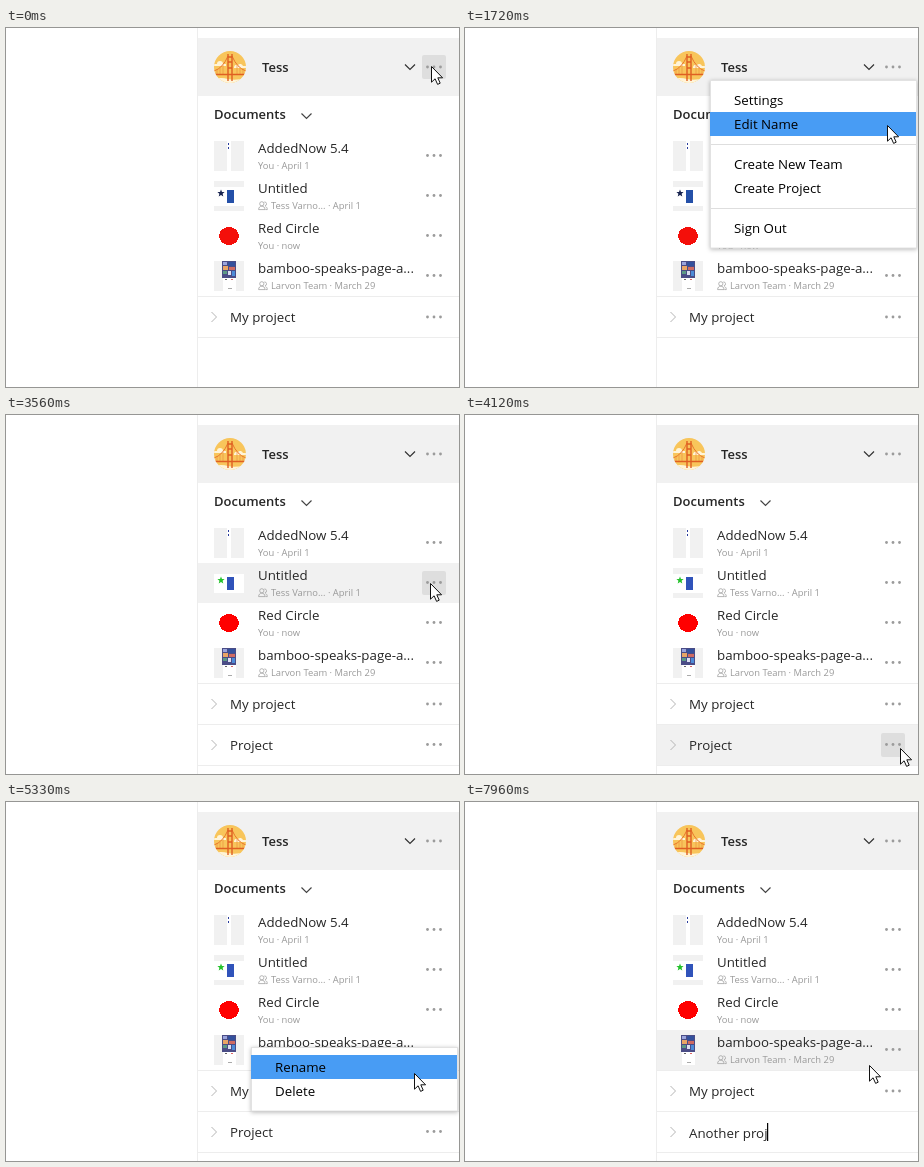
Write an HTML page that moves like this. It is 453 px wide and 359 px high and loops after 8 s.

```html
<!DOCTYPE html>
<html lang="en">
<head>
<meta charset="utf-8">
<title>Project panel</title>
<style>
  html, body { margin: 0; width: 100%; height: 100%; overflow: hidden; background: #fff; }
  svg { display: block; width: 453px; height: 359px; }
  text { font: 13.3px "Open Sans", "Noto Sans", sans-serif; fill: #262626; white-space: pre; }
  .bold { font-size: 13px; font-weight: 600; }
  .sub { font-size: 9.4px; fill: #999; }
  .menu text { fill: #000; }
  .line { stroke: #ededed; fill: none; }
  .dots { fill: #9b9b9b; }
  .sheet { fill: #fff; stroke: #e2e2e2; filter: drop-shadow(0 1px 2px rgba(0, 0, 0, .28)); }
</style>
</head>
<body>
<svg id="stage" viewBox="0 0 453 359" xmlns="http://www.w3.org/2000/svg"></svg>
<script>
const LOOP = 8000;
const CREATED = 3510, EDITING = 5930;

const rect = (x, y, w, h, fill, extra = '') =>
  `<rect x="${x}" y="${y}" width="${w}" height="${h}" fill="${fill}" ${extra}/>`;
const label = (x, y, str, cls = '') => `<text x="${x}" y="${y}" class="${cls}">${str}</text>`;
const stroke = (d, color, width = 1) =>
  `<path d="${d}" fill="none" stroke="${color}" stroke-width="${width}"/>`;
const dots = (y, id = '') => `<g class="dots" id="${id}">` +
  [421.5, 428, 434.5].map(x => `<circle cx="${x}" cy="${y}" r="1.4"/>`).join('') + '</g>';
const divider = y => `<path class="line" d="M192 ${y}H453"/>`;
const arrowRight = y => stroke(`M205.5 ${y - 5}l5 5l-5 5`, '#b5b5b5');
const arrowDown = (x, y, color) => stroke(`M${x} ${y}l5 5l5-5`, color, 1.2);
const people = y => `<g transform="translate(252 ${y})">` + stroke(
  'M3.8 .7a2 2 0 1 1 0 4.2a2 2 0 1 1 0-4.2M.6 8.6c0-4.6 6.4-4.6 6.4 0zM6.3 1a1.8 1.8 0 0 1 .6 3.8M7.3 5.6c1.4.4 2 1.4 2 3H7.4',
  '#a3a3a3', .8) + '</g>';

// Hoverable rows: top, height and centre of the options button
const rows = [
  ...[0, 1, 2, 3].map(i => ({ y: 108 + 40 * i, h: 40, mid: 127.5 + 40 * i })),
  { y: 269, h: 40, mid: 289 },
  { y: 310, h: 40, mid: 329.5, created: true }
];

const documents = [
  ['AddedNow 5.4', 'You · April 1'],
  ['Untitled', 'Tess Varno... · April 1', true],
  ['Red Circle', 'You · now'],
  ['bamboo-speaks-page-a...', 'Larvon Team · March 29', true]
];

const menus = [
  { y: 52, h: 168, open: [690, 930], close: [2700, 2810], press: 650, pick: 2530, seps: [116, 180],
    items: [['Settings', 60], ['Edit Name', 84], ['Create New Team', 124], ['Create Project', 148], ['Sign Out', 188]] },
  { y: 245, h: 64, open: [4480, 4700], close: [5950, 6070], press: 4440, pick: 5790, seps: [],
    items: [['Rename', 253], ['Delete', 277]] }
];

// time, x, y, easing power towards this point (negative eases out)
const path = [
  [1530, 426, 38, 1], [1720, 423, 97, 1.3], [2100, 424, 160, -1.8],
  [3510, 424, 160, 1], [3780, 430, 246, 1.4], [4120, 436, 333, -1.8],
  [5050, 436, 333, 1], [5330, 409, 271, 1.3], [5510, 405, 263, -1.8]
];

const avatar = `
  <clipPath id="disc"><circle cx="224" cy="39" r="16"/></clipPath>
  <g clip-path="url(#disc)">
    ${rect(208, 23, 32, 32, '#f8c55b')}
    <path d="M208 36h3a3 3 0 0 1 6 0h3v2h-12zM228 39a3 3 0 0 1 4-2a3 3 0 0 1 5 1h3v2h-12zM208 51q7-2 14 0t18-1v7h-32z" fill="#fff4d8"/>
    ${stroke('M208 43Q217 40 222 28M240 43Q231 40 226 28', '#e8742b')}
    ${stroke('M211 42v4M214 40v6M217 37v9M231 37v9M234 40v6M237 42v4', '#ee9440', .7)}
    ${stroke('M222 26v27M226 26v27', '#df5f22', 1.4)}
    ${stroke('M222 29h4M222 34h4M222 40h4M208 46.5h32', '#df5f22', 1.4)}
  </g>`;

const star = 'M215 161.5l1 2.4 2.6.2-2 1.7.7 2.6-2.3-1.4-2.3 1.4.7-2.6-2-1.7 2.6-.2z';
const thumbs = `
  ${rect(208, 113, 13, 30, '#f1f1f1')}${rect(225, 113, 13, 30, '#f1f1f1')}
  ${rect(222, 115, 1, 2, '#2a3c9c')}${rect(222, 119, 1, 2, '#2a3c9c')}
  ${rect(208, 153, 30, 30, '#f1f1f1')}${rect(208, 159, 30, 19, '#fff')}
  <path id="star" d="${star}"/>${rect(221, 162, 7, 13, '#2450a8', 'id="block"')}
  ${rect(208, 193, 30, 30, '#fff')}
  <ellipse id="red" cx="223" cy="208" rx="10" ry="9" shape-rendering="crispEdges"/>
  ${rect(208, 233, 30, 30, '#f1f1f1')}
  ${rect(216, 233, 14, 17, '#4a4c86')}
  ${rect(217, 234, 4, 3, '#9aa4dc')}${rect(222, 234, 7, 4, '#33509c')}
  ${rect(217, 238, 5, 4, '#e9a565')}${rect(223, 239, 6, 3, '#cf6a62')}
  ${rect(217, 243, 4, 3, '#5b9a86')}${rect(222, 243, 3, 4, '#dcdff2')}${rect(226, 243, 3, 5, '#4d8bd8')}
  ${rect(217, 250, 13, 13, '#fff')}
  ${rect(219, 251, 2, 1, '#666')}${rect(225, 251, 2, 1, '#d66')}${rect(222, 260, 4, 1, '#aaa')}`;

const menuMarkup = (m, i) => `<g class="menu" id="menu${i}">
  <rect class="sheet" x="245.5" y="${m.y + .5}" width="206" height="${m.h - .5}"/>
  ${rect(245, 0, 206, 24, '#489cf4', `id="pick${i}"`)}
  ${m.seps.map(y => stroke(`M246 ${y + .5}H451`, '#dedede')).join('')}
  ${m.items.map(([name, y]) => label(269, y + 17, name)).join('')}
</g>`;

const stage = document.getElementById('stage');
stage.innerHTML = `
  ${rect(0, 0, 453, 359, '#fff')}
  ${rect(192, 10, 261, 58, '#f1f1f1')}
  ${rect(192, 0, 261, 40, '#f1f1f1', 'id="hover"')}
  <path class="line" d="M191.5 0V359"/>
  ${divider(268.5)}${divider(309.5)}
  ${avatar}
  ${label(256, 44, 'Tess', 'bold')}${arrowDown(399, 36.5, '#333')}
  ${label(208, 91, 'Documents', 'bold')}${arrowDown(295.5, 85.5, '#444')}
  ${thumbs}
  ${documents.map(([name, info, shared], i) => {
    const y = 125 + 40 * i;
    return label(252, y, name) + label(shared ? 265 : 252, y + 16, info, 'sub') + (shared ? people(y + 8) : '');
  }).join('')}
  ${arrowRight(289)}${label(224, 294, 'My project')}
  ${rect(416, 0, 24, 24, '#dedede', 'id="button" rx="2"')}
  ${dots(39)}${rows.slice(0, 5).map(r => dots(r.mid)).join('')}
  <g id="project">
    ${divider(350.5)}${arrowRight(330)}
    ${rect(224, 321, 43, 18, '#cce4fb', 'id="selection"')}
    <text id="name" x="224"></text>
    ${rect(0, 321, 1.2, 18, '#000', 'id="caret"')}
    ${dots(329.5, 'projectDots')}
  </g>
  ${menus.map(menuMarkup).join('')}
  <path id="cursor" d="M.5 .5V16.2L4.1 12.8L6.6 18.4L9.2 17.2L6.8 11.8H11.6Z" fill="#fff" stroke="#111" stroke-linejoin="round"/>`;

const $ = id => document.getElementById(id);
const set = (id, attrs) => { for (const k in attrs) $(id).setAttribute(k, attrs[k]); };
const show = (id, on) => set(id, { visibility: on ? 'visible' : 'hidden' });
const progress = (t, [a, b]) => Math.min(1, Math.max(0, (t - a) / (b - a)));

function cursorAt(t) {
  let from = path[0];
  for (const to of path) {
    if (t < to[0]) {
      const p = progress(t, [from[0], to[0]]), k = to[3];
      const e = k > 0 ? p ** k : 1 - (1 - p) ** -k;
      return [1, 2].map(i => from[i] + (to[i] - from[i]) * e);
    }
    from = to;
  }
  return from.slice(1, 3);
}

function typedCount(t) {
  if (t < 7040) return 0;
  if (t < 7870) return Math.min(10, 1 + Math.floor((t - 7040) / 81));
  return t < 7960 ? 11 : 12;
}

function drawMenus(t, y) {
  menus.forEach((m, i) => {
    const alpha = progress(t, m.open) * (1 - progress(t, m.close));
    set('menu' + i, { opacity: alpha });
    const item = m.items.find(([, top]) => y >= top && y < top + 24);
    const active = item && t >= m.press && t < m.pick;
    set('pick' + i, { y: item ? item[1] : 0, opacity: active ? 1 : 0 });
  });
}

function drawHover(t, x, y) {
  const blocked = menus.some(m => t >= m.press && t < m.pick);
  const row = rows.find(r => y >= r.y - 1 && y < r.y + r.h && (!r.created || t >= CREATED));
  show('hover', row && !blocked);
  if (row) set('hover', { y: row.y, height: row.h });
  const mid = row ? row.mid : 39;
  const over = x >= 416 && x <= 440 && Math.abs(y - mid) <= 12;
  show('button', over && !blocked);
  set('button', { y: Math.ceil(mid) - 12 });
}

function drawProject(t) {
  const count = typedCount(t), editing = t >= EDITING, name = $('name');
  const selected = editing && !count;
  set('project', { display: t >= CREATED ? 'inline' : 'none' });
  name.textContent = count ? 'Another project'.slice(0, count) : 'Project';
  name.style.fill = selected ? '#46607c' : '';
  set('name', { y: editing ? 336 : 335 });
  set('selection', { opacity: selected ? 1 : 0 });
  set('caret', { x: 223.5 + name.getComputedTextLength(), opacity: count ? 1 : 0 });
  set('projectDots', { opacity: editing ? 0 : 1 });
}

function draw(t) {
  const [x, y] = cursorAt(t), vivid = t >= CREATED;
  set('star', { fill: vivid ? '#25c22c' : '#17234f' });
  set('block', { fill: vivid ? '#3053ba' : '#2450a8' });
  set('red', { fill: vivid ? '#ff0000' : '#f40f0a' });
  drawProject(t);
  drawHover(t, x, y);
  drawMenus(t, y);
  set('cursor', { transform: `translate(${Math.round(x) - 1} ${Math.round(y)})` });
}

const start = performance.now();
function tick() {
  draw((performance.now() - start) % LOOP);
  requestAnimationFrame(tick);
}
tick();
</script>
</body>
</html>
```
